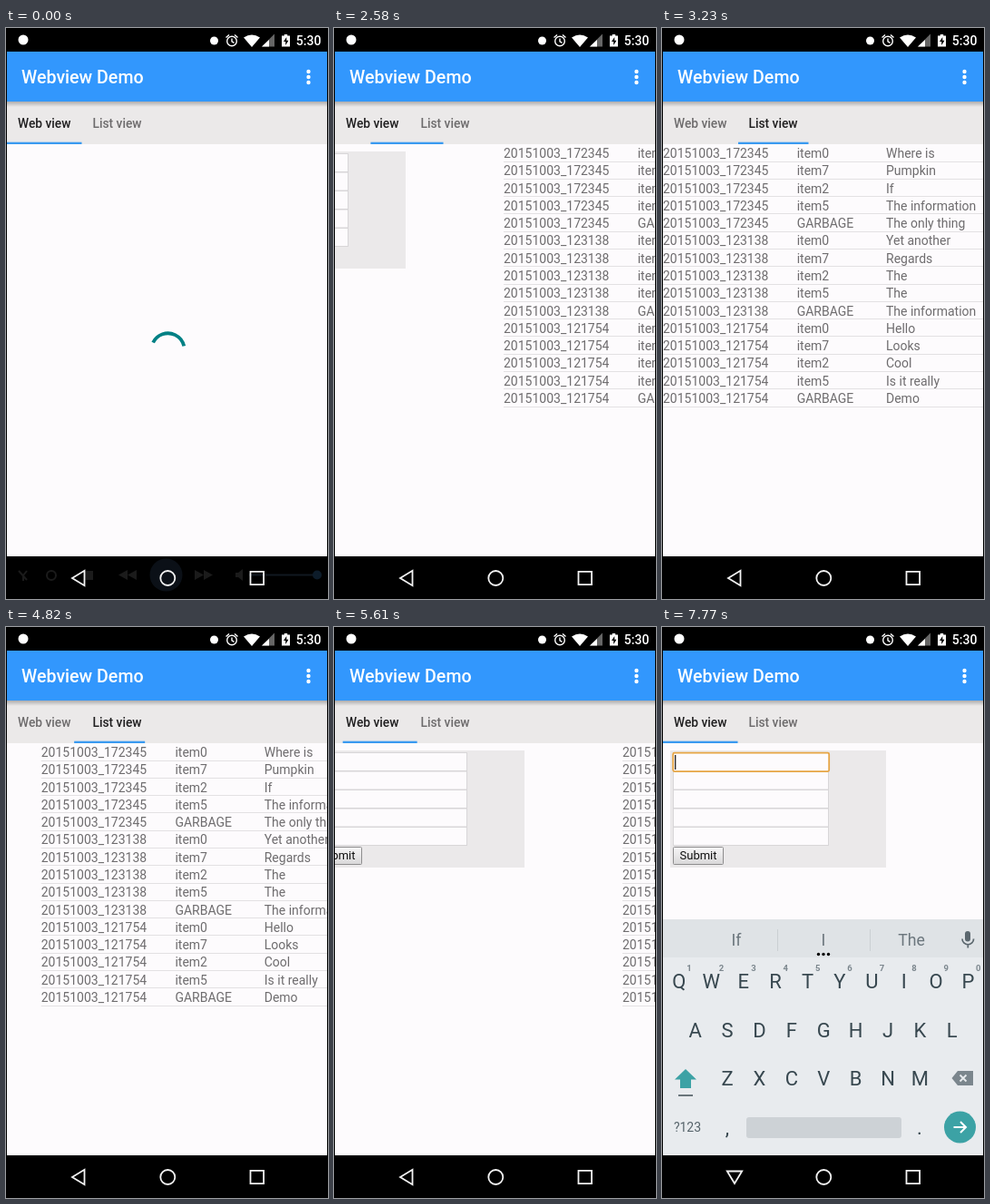
An HTML page that plays this animation: 355x629 px, repeating every 8000 ms.

```html
<!DOCTYPE html>
<html lang="en">
<head>
<meta charset="utf-8">
<title>Webview Demo</title>
<style>
html, body { margin: 0; width: 100%; height: 100%; overflow: hidden; background: #000; }
svg { display: block; width: 355px; height: 629px; font-family: Roboto, "Noto Sans", sans-serif; }
.mid { text-anchor: middle; }
.cells { font-size: 14px; fill: #6e6c6e; }
.tab { font-size: 13.75px; font-weight: 500; }
.key { font-size: 22px; fill: #37474f; text-anchor: middle; }
.hint { font-size: 9.5px; font-weight: 700; fill: #7b868d; text-anchor: middle; }
.word { font-size: 17.7px; fill: #6b767d; text-anchor: middle; }
</style>
</head>
<body>
<svg viewBox="0 0 355 629">
  <defs>
    <linearGradient id="shade" x2="0" y2="1">
      <stop stop-color="#000" stop-opacity=".26"/>
      <stop offset="1" stop-color="#000" stop-opacity="0"/>
    </linearGradient>
    <linearGradient id="face" x2="0" y2="1">
      <stop stop-color="#f7f6f7"/>
      <stop offset="1" stop-color="#d9d8d9"/>
    </linearGradient>
    <clipPath id="page"><path d="M1 128h353v454H1z"/></clipPath>
  </defs>
  <path d="M0 0h355v629H0z"/>

  <!-- status bar -->
  <g fill="#fff">
    <circle cx="19" cy="13" r="5.5"/>
    <circle cx="229.500" cy="14" r="4.500"/>
    <g fill="none" stroke="#fff" stroke-width="1.400">
      <circle cx="249" cy="14.500" r="5.300"/>
      <path d="M249 11.500v3.300l2.500 1.500M242.500 10.500l3.500-3M255.500 10.500l-3.500-3"/>
    </g>
    <path d="M262 10.500q9-6 18 0L271 21z"/>
    <path d="M282 20.500h14v-14z" fill="#666"/>
    <path d="M282 20.500h8v-7.500z"/>
    <path d="M304 8.500h2.800V7h3.400v1.500h2.800v12h-9z"/>
    <path d="M309.300 10l-3.300 5h2.200v4l3.300-5.200h-2.200z" fill="#000"/>
    <text x="319.800" y="19" font-size="14" font-weight="500">5:30</text>
  </g>

  <!-- toolbar and tabs -->
  <path d="M1 26h353v55H1z" fill="#3297fd"/>
  <path d="M1 81h353v47H1z" fill="#ebe9e9"/>
  <path d="M1 81h353v6H1z" fill="url(#shade)"/>
  <text x="17" y="61" font-size="19.600" font-weight="500" fill="#fff">Webview Demo</text>
  <g fill="#fff">
    <circle cx="333.500" cy="48" r="2.200"/>
    <circle cx="333.500" cy="54" r="2.200"/>
    <circle cx="333.500" cy="60" r="2.200"/>
  </g>
  <text id="tabWeb" class="tab" x="13" y="109.500">Web view</text>
  <text id="tabList" class="tab" x="95.500" y="109.500">List view</text>
  <rect id="bar" y="125.700" height="2.300" fill="#3a9af0"/>

  <!-- pages -->
  <path d="M1 128h353v454H1z" fill="#fdfbfd"/>
  <g clip-path="url(#page)">
    <circle id="spin" cx="178.500" cy="354.500" r="18.200" fill="none" stroke="#008084" stroke-width="3.800" pathLength="360"/>
    <g id="form">
      <path d="M9 136h238v129H9z" fill="#ebe9ea"/>
      <g id="inputs" fill="#fdfbfd" stroke="#d8d6d8"></g>
      <rect x="12.500" y="242.500" width="55" height="19" rx="1" fill="url(#face)" stroke="#8e8d8e"/>
      <text class="mid" x="40" y="256" font-size="13" fill="#111">Submit</text>
      <rect id="focus" x="12.200" y="138.700" width="172" height="20.400" rx="1.500" fill="#fdfbfd" stroke="#e6a544" stroke-width="1.800"/>
      <path id="caret" d="M14.700 141v16" stroke="#222" stroke-width="1.300"/>
    </g>
    <g id="list" class="cells"></g>
    <g id="board">
      <path d="M1 322h353v42H1z" fill="#dfe3e6"/>
      <path d="M1 364h353v244H1z" fill="#e8ebee"/>
      <g id="words">
        <path d="M127.500 333v24M229.500 333v24" stroke="#cbd0d3"/>
        <text class="word" x="82" y="351">If</text>
        <text class="word" x="178" y="351">I</text>
        <text class="word" x="275" y="351">The</text>
        <circle cx="172.500" cy="360.500" r="1.700"/>
        <circle cx="178" cy="360.500" r="1.700"/>
        <circle cx="183.500" cy="360.500" r="1.700"/>
      </g>
      <rect x="334" y="335" width="6" height="11.500" rx="3" fill="#5b676e"/>
      <path d="M331 343.500a6.300 6.300 0 0 0 12.600 0M337.300 350v3.500" fill="none" stroke="#5b676e" stroke-width="1.700"/>
      <g id="keys"></g>
      <path d="M26 487l12 11.500h-6V508H20v-9.500h-6z" fill="#3ca2a5"/>
      <path d="M18 516h16" stroke="#6a757b" stroke-width="2"/>
      <path d="M326 489h17v16h-17l-6.500-8z" fill="#7b868d"/>
      <path d="M328.500 493.500l7 7m0-7l-7 7" stroke="#e8ebee" stroke-width="1.800"/>
      <text class="mid" x="28" y="556" font-size="14" fill="#56636a">?123</text>
      <text class="key" x="72" y="559">,</text>
      <rect x="93" y="540" width="171" height="23" rx="3" fill="#cdd2d6"/>
      <text class="key" x="284" y="559">.</text>
      <circle cx="328.500" cy="551" r="17.500" fill="#3ca2a5"/>
      <path d="M321.500 551h13.500m-6-6l6 6l-6 6" fill="none" stroke="#fff" stroke-width="2"/>
    </g>
  </g>

  <!-- navigation bar -->
  <g id="player" fill="#1b1b1b">
    <path d="M14 598l9 10m0-10l-4 5v6" fill="none" stroke="#1b1b1b" stroke-width="2"/>
    <circle cx="50" cy="603" r="5" fill="none" stroke="#1b1b1b" stroke-width="2"/>
    <path d="M86 598h10v10H86zM134 597v11l-10-5.500zM144 597v11l-10-5.500zM208 597v11l10-5.500zM218 597v11l10-5.500zM253 600h3l5-4v13l-5-4h-3z"/>
    <circle cx="176.500" cy="602.500" r="18" fill="#0b1017"/>
    <path d="M268 602.500h74" stroke="#111820" stroke-width="2"/>
    <circle cx="343" cy="602.500" r="5" fill="#0d1c2a"/>
  </g>
  <g fill="none" stroke="#f2f2f2" stroke-width="1.800">
    <path id="back" d="M-7 0L6.500-8.200V8.200z"/>
    <circle cx="178.300" cy="606" r="8"/>
    <path d="M269.500 598.800h14.600v14.400h-14.600z"/>
  </g>
</svg>
<script>
const LOOP = 8000, PAGE = 354;
const $ = id => document.getElementById(id);
const set = (id, attrs) => { for (const k in attrs) $(id).setAttribute(k, attrs[k]); };
const show = (id, on) => set(id, { display: on ? 'inline' : 'none' });
const text = (cls, x, y, s) => `<text class="${cls}" x="${x}" y="${y}">${s}</text>`;

// static parts
$('inputs').innerHTML = [0, 1, 2, 3, 4].map(i =>
  `<rect x="12.5" y="${138.5 + 20.5 * i}" width="171" height="20"/>`).join('');

const stamps = ['172345', '123138', '121754'];
const items = ['item0', 'item7', 'item2', 'item5', 'GARBAGE'];
const notes = ['Where is', 'Pumpkin', 'If', 'The information', 'The only thing',
  'Yet another', 'Regards', 'The', 'The', 'The information',
  'Hello', 'Looks', 'Cool', 'Is it really', 'Demo'];
$('list').innerHTML = notes.map((note, i) => {
  const y = 143 + 19.29 * i, line = Math.floor(y + 4) + 0.5;
  return text('', 1, y, '20151003_' + stamps[Math.floor(i / 5)]) +
    text('', 148.7, y, items[i % 5]) + text('', 247, y, note) +
    `<path d="M1 ${line}h353" stroke="#e3e1e3"/>`;
}).join('');

const rows = [['QWERTYUIOP', 18.9, 398], ['ASDFGHJKL', 36.6, 452], ['ZXCVBNM', 72, 505]];
$('keys').innerHTML = rows.map(([chars, x, y], r) => [...chars].map((c, i) => {
  const cx = x + 35.4 * i;
  return text('key', cx, y, c) + (r ? '' : text('hint', cx + 11.2, 378.5, (i + 1) % 10));
}).join('')).join('');

// swipe: time, page shift, number of equal hops to the next row
const swipe = [
  [0, 0, 1], [1999.9, 0, 1], [2000, 9, 11], [2580, 168, 4], [2760, 228, 1],
  [2820, 262, 3], [2974, 326, 5], [3230, PAGE, 1], [4689.9, PAGE, 1],
  [4690, 345, 11], [5220, 187, 5], [5480, 92, 1], [5530, 58, 2],
  [5615, 16, 2], [5700, 0, 1], [LOOP, 0, 1]
];

function shiftAt(t) {
  const i = swipe.findIndex((row, n) => t >= row[0] && t < swipe[n + 1][0]);
  const [a, from, hops] = swipe[i], [b, to] = swipe[i + 1];
  return from + (to - from) * Math.floor(hops * (t - a) / (b - a) + 1e-6) / hops;
}

function draw(t) {
  // loading
  const hop = t < 60 ? 0 : 1 + Math.floor((t - 60) / 67.5);
  const loaded = t >= 330;
  show('spin', !loaded);
  show('form', loaded);
  set('spin', {
    'stroke-dasharray': `${141 + 16 * hop} 360`,
    transform: `rotate(${206 + 24 * hop} 178.5 354.5)`
  });
  set('player', { opacity: Math.max(0, 1 - hop / 4) });

  // pages and tabs
  const shift = shiftAt(t), p = shift / PAGE;
  set('form', { transform: `translate(${-shift})` });
  set('list', { transform: `translate(${PAGE - shift})` });
  const left = 1 + 83 * p, right = 83.5 + 78 * p;
  set('bar', { x: left, width: right - left });
  const onList = t >= 2760 && t < 5480;
  set('tabWeb', { fill: onList ? '#6d6b6c' : '#1f1e1f' });
  set('tabList', { fill: onList ? '#1f1e1f' : '#6d6b6c' });

  // focus and keyboard
  show('focus', t >= 6820);
  show('caret', t >= 6820 && t < 7335 || t >= 7770);
  const step = t < 7280 ? 0 : Math.min(5, 1 + Math.floor((t - 7280) / 55 + 1e-6));
  const rise = 1 - (1 - step / 5) ** 2;
  show('board', step > 0);
  set('board', { opacity: rise, transform: `translate(0 ${26 * (1 - rise)})` });
  show('words', t >= 7650);
  set('back', { transform: `translate(80 606) rotate(${-90 * rise})` });
}

function tick() {
  draw(performance.now() % LOOP);
  requestAnimationFrame(tick);
}
tick();
</script>
</body>
</html>
```
